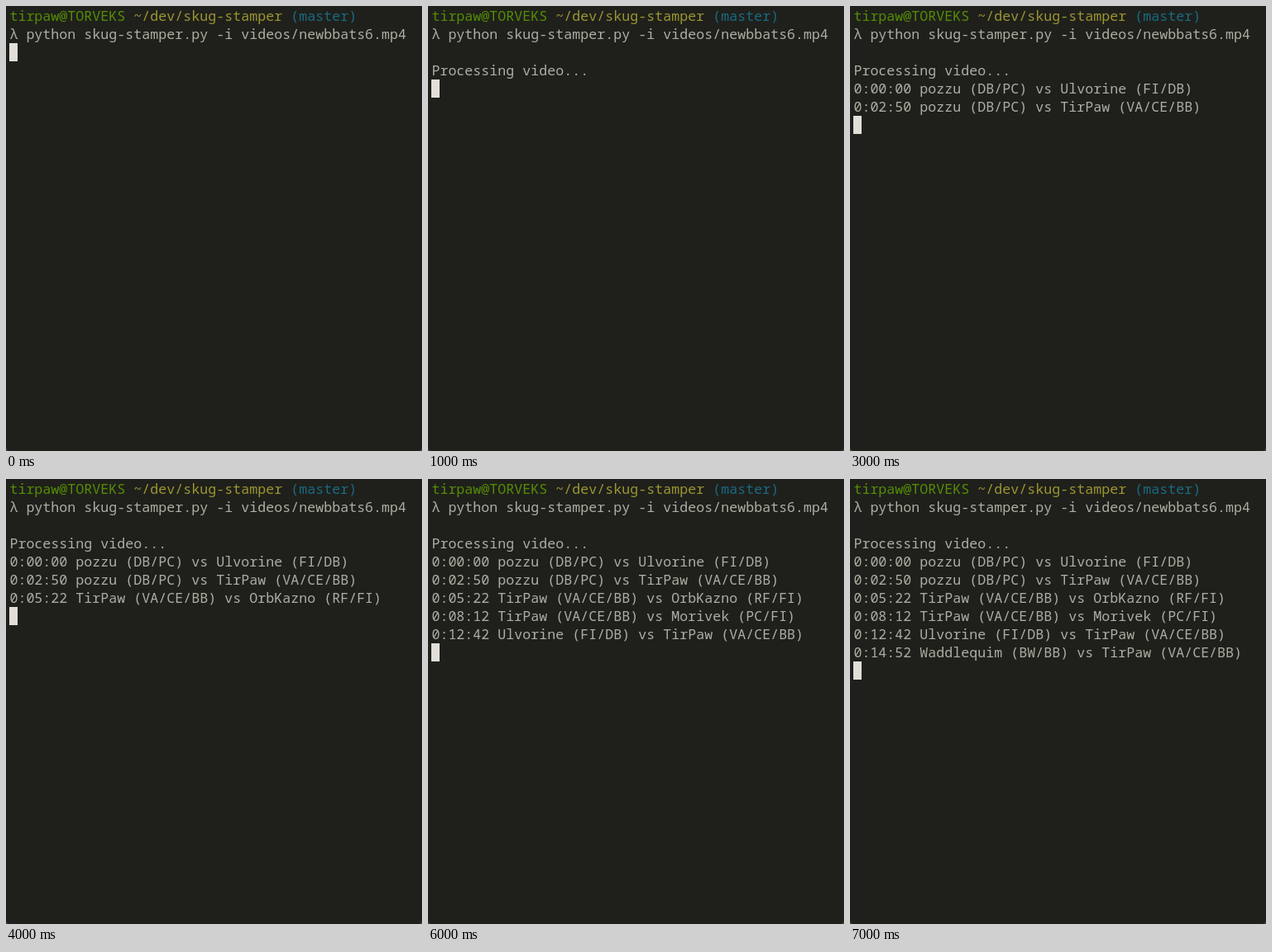
Write an HTML page that moves like this. It is 503 by 539 pixels and loops after 8 s.

```html
<!DOCTYPE html>
<html lang="en">
<head>
<meta charset="utf-8">
<style>
  html, body { margin: 0; height: 100%; overflow: hidden; background: #3a3a38; }
  svg { display: block; width: 503px; height: 539px; background: #1f201b; border-radius: 0 0 5px 5px; }
  text { font: 16.667px "Noto Sans Mono", monospace; fill: #aeada4; white-space: pre; }
  .user { fill: #568c06; }
  .path { fill: #9c9532; }
  .branch { fill: #1a6a84; }
</style>
</head>
<body>
<svg viewBox="0 0 503 539">
  <text x="4.4" y="18"><tspan class="user">tirpaw@TORVEKS</tspan> <tspan class="path">~/dev/skug-stamper</tspan> <tspan class="branch">(master)</tspan></text>
  <text x="4.4" y="40">λ python skug-stamper.py -i videos/newbbats6.mp4</text>
  <g id="output"></g>
  <rect id="cursor" x="4" width="10" height="22" fill="#e1dfd8"/>
</svg>
<script>
  const ROW = 22, STEP = 1000;
  const lines = [
    'Processing video...',
    '0:00:00 pozzu (DB/PC) vs Ulvorine (FI/DB)',
    '0:02:50 pozzu (DB/PC) vs TirPaw (VA/CE/BB)',
    '0:05:22 TirPaw (VA/CE/BB) vs OrbKazno (RF/FI)',
    '0:08:12 TirPaw (VA/CE/BB) vs Morivek (PC/FI)',
    '0:12:42 Ulvorine (FI/DB) vs TirPaw (VA/CE/BB)',
    '0:14:52 Waddlequim (BW/BB) vs TirPaw (VA/CE/BB)'
  ];
  const output = document.getElementById('output');
  const cursor = document.getElementById('cursor');

  const rows = lines.map((line, i) => {
    const text = document.createElementNS('http://www.w3.org/2000/svg', 'text');
    text.setAttribute('x', 4.4);
    text.setAttribute('y', 18 + ROW * (i + 3));
    text.textContent = line;
    return output.appendChild(text);
  });

  // One more line is printed each second; the cursor waits below the last one.
  function draw(now) {
    const shown = Math.floor(now / STEP) % (lines.length + 1);
    rows.forEach((row, i) => row.setAttribute('visibility', i < shown ? 'visible' : 'hidden'));
    cursor.setAttribute('y', 1 + ROW * (shown ? shown + 3 : 2));
  }

  let start;
  function tick(now) {
    start ??= now;
    draw(now - start);
    requestAnimationFrame(tick);
  }
  draw(0);
  requestAnimationFrame(tick);
</script>
</body>
</html>
```
